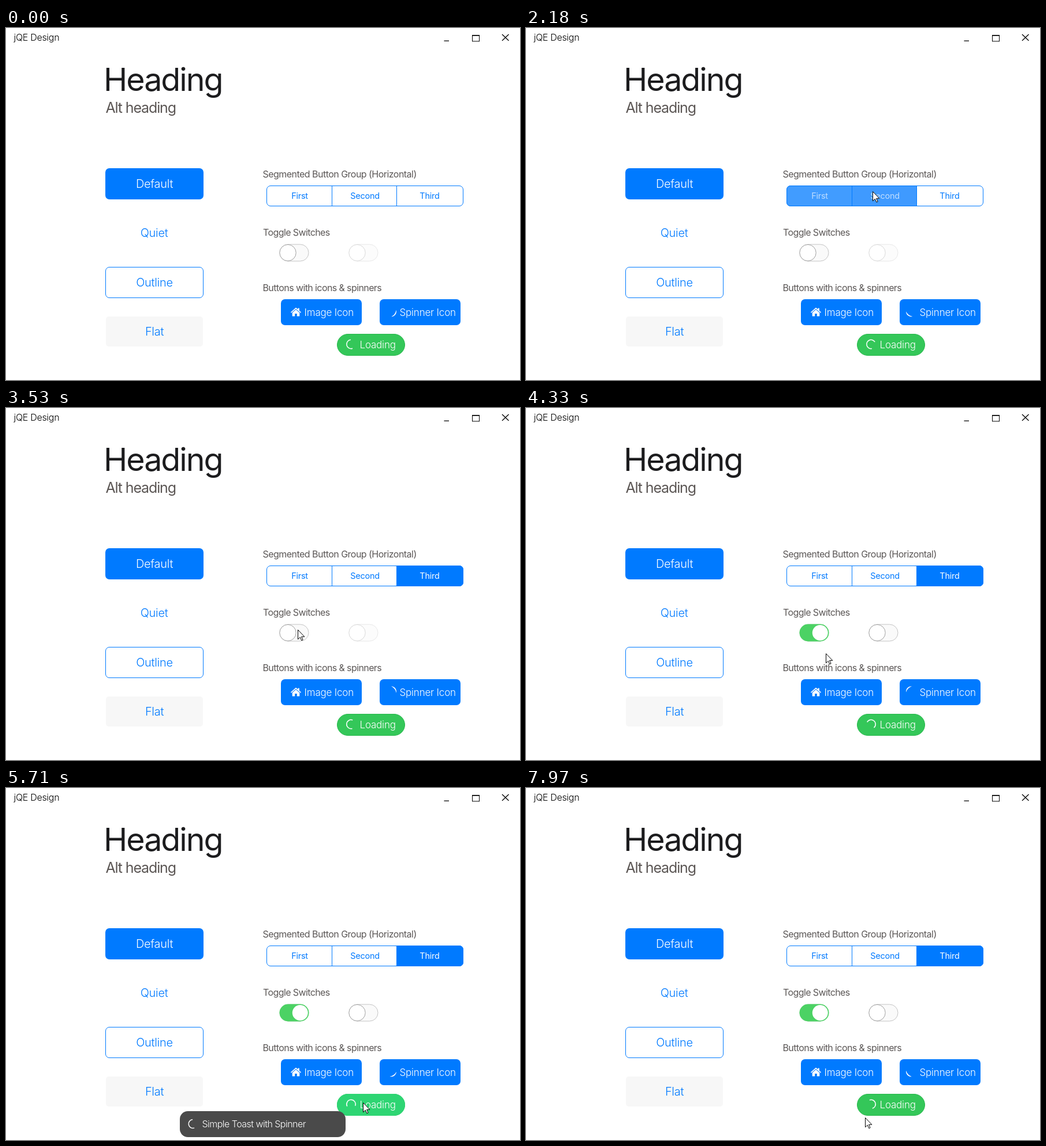
An HTML page for the animation above (8000 ms loop, 890x610 px).

```html
<!DOCTYPE html>
<html lang="en">
<head>
<meta charset="utf-8">
<title>Design widgets</title>
<style>
  html, body { margin: 0; width: 100%; height: 100%; overflow: hidden; background: #fff; }
  svg { display: block; width: 890px; height: 610px; }
  text { font-family: Inter, "Open Sans", sans-serif; font-optical-sizing: none; }
  .mid { text-anchor: middle; }
  .label { font-size: 16px; letter-spacing: -.6px; fill: #5b5756; }
  .big { font-size: 20px; font-weight: 300; letter-spacing: -.3px; }
  .seg { font-size: 14.5px; letter-spacing: -.25px; }
  .btn { font-size: 17px; font-weight: 300; letter-spacing: -.2px; fill: #fff; }
  .blue { fill: #007aff; }
  .white { fill: #fff; }
  .line { fill: none; stroke: #007aff; }
  .window { fill: none; stroke: #000; stroke-width: 1.3; }
  .spin { fill: none; stroke: #fff; stroke-width: 1.5; }
</style>
</head>
<body>
<svg viewBox="0 0 890 610">
  <defs>
    <clipPath id="round"><rect x="451" y="273" width="341" height="36" rx="7"/></clipPath>
  </defs>

  <text x="13.5" y="22" font-size="16" font-weight="300" letter-spacing="-.3">jQE Design</text>
  <g class="window">
    <path d="M758.5 22.3h8.5M859 11l11.500 11M870.500 11l-11.500 11M807 13h13"/>
    <rect x="807.5" y="12.5" width="12" height="10.500" stroke-width="1"/>
  </g>

  <text x="169" y="109" font-size="55.5" letter-spacing="-2" fill="#1c1c1e">Heading</text>
  <text x="172.5" y="147" font-size="25" letter-spacing="-1.15" fill="#5b5654">Alt heading</text>

  <rect class="blue" x="172" y="243" width="170" height="54" rx="7"/>
  <rect class="line" x="172.5" y="414.5" width="169" height="53" rx="6.5"/>
  <rect x="173" y="500" width="168" height="52" rx="5" fill="#f7f7f7"/>
  <g class="big mid">
    <text class="white" x="257" y="277">Default</text>
    <text class="blue" x="256.5" y="362">Quiet</text>
    <text class="blue" x="257" y="448">Outline</text>
    <text class="blue" x="257" y="533">Flat</text>
  </g>

  <text class="label" x="444.5" y="259" style="letter-spacing: -.53px">Segmented Button Group (Horizontal)</text>
  <text class="label" x="445" y="360">Toggle Switches</text>
  <text class="label" x="444.5" y="456">Buttons with icons &amp; spinners</text>

  <g class="seg mid blue">
    <text x="508.5" y="296">First</text>
    <text x="621.5" y="296">Second</text>
    <text x="733.5" y="296">Third</text>
  </g>
  <g class="seg mid" clip-path="url(#round)">
    <g id="first"><rect class="blue" x="451" y="273" width="114" height="36"/><text class="white" x="508.5" y="296">First</text></g>
    <g id="second"><rect class="blue" x="564" y="273" width="113" height="36"/><text class="white" x="621.5" y="296">Second</text></g>
    <g id="third"><rect class="blue" x="676" y="273" width="116" height="36"/><text class="white" x="733.5" y="296">Third</text></g>
  </g>
  <rect class="line" x="451.5" y="273.5" width="340" height="35" rx="6.5"/>
  <path class="line" d="M564.5 274v34M676.5 274v34"/>

  <rect x="474" y="375" width="50" height="29" rx="14.5" fill="#fafafa" stroke="#c4c4c4"/>
  <rect id="green" x="473.5" y="374.5" width="51" height="30" rx="15" fill="#4cd264"/>
  <circle id="knob" cy="389.5" fill="#fff"/>
  <g id="toggle2">
    <rect x="594" y="375" width="50" height="29" rx="14.5" fill="#fafafa" stroke="#c4c4c4"/>
    <circle cx="608" cy="389.5" r="14.2" fill="#fff" stroke="#a0a0a0"/>
  </g>

  <rect class="blue" x="476" y="470" width="140" height="45" rx="7"/>
  <path class="white" d="M493 492.6l9-8 3.4 3v-2h2.4v4.1l3.2 2.9-1 1.2-8-7.1-8 7.1zM495.7 493.5l6.3-5.5 6.3 5.5v6h-4.5v-4.5h-3.6v4.5h-4.5z"/>
  <text class="btn" x="516.5" y="499">Image Icon</text>
  <rect class="blue" x="647" y="470" width="140" height="45" rx="7"/>
  <rect id="hoverBlue" x="647" y="470" width="140" height="45" rx="7" fill="#2b90ff"/>
  <path id="crescent" class="white"/>
  <text class="btn" x="681.5" y="499">Spinner Icon</text>

  <rect x="573.5" y="530.5" width="117" height="37" rx="18.5" fill="#34c759" stroke="#28b84c"/>
  <rect id="hoverGreen" x="573" y="530" width="118" height="38" rx="19" fill="#2ed573"/>
  <path id="loader" class="spin"/>
  <text class="btn" x="612.5" y="555">Loading</text>

  <g id="toast">
    <rect x="301" y="560" width="287" height="45" rx="14" fill="#4a4a4a"/>
    <path id="toastLoader" class="spin"/>
    <text class="white" x="339.5" y="588" font-size="16" font-weight="300" letter-spacing="-.53">Simple Toast with Spinner</text>
  </g>

  <path id="cursor" d="M.5.5v16.3l3.8-3.6 2.5 5.6 2.3-1-2.5-5.5h5.2z" fill="#fff" stroke="#000"/>
</svg>

<script>
const LOOP = 8000, CYCLE = 1247;
const el = id => document.getElementById(id);
const set = (id, attr, value) => el(id).setAttribute(attr, value);

// Linear interpolation through rows of [position, ...values].
function along(rows, p) {
  const i = rows.findIndex(row => row[0] > p);
  if (i < 0) return rows[rows.length - 1].slice(1);
  if (i === 0) return rows[0].slice(1);
  const a = rows[i - 1], b = rows[i], k = (p - a[0]) / (b[0] - a[0]);
  return a.slice(1).map((v, n) => v + (b[n + 1] - v) * k);
}

const ramp = (t, start, length) => Math.min(1, Math.max(0, (t - start) / length));
const pulse = (t, on, off, fade) => ramp(t, on, fade) - ramp(t, off, fade);
const ease = k => k * k * (3 - 2 * k);

// Angles are clockwise degrees from the top.
function point(cx, cy, r, deg) {
  const a = deg * Math.PI / 180;
  return (cx + r * Math.sin(a)).toFixed(2) + " " + (cy - r * Math.cos(a)).toFixed(2);
}

function arc(cx, cy, r, from, to) {
  const large = to - from > 180 ? 1 : 0;
  return `M${point(cx, cy, r, from)}A${r} ${r} 0 ${large} 1 ${point(cx, cy, r, to)}`;
}

// Arc with tapered ends, closed by a flatter curve.
function crescent(cx, cy, r, mid) {
  const from = mid - 52, to = mid + 52;
  return arc(cx, cy, r, from, to) + `A16 16 0 0 0 ${point(cx, cy, r, from)}Z`;
}

// Leading and trailing end of the breathing spinner over one cycle.
const breath = [
  [0, 160, 272], [.27, -20, 162], [.46, -120, 110], [.625, -190, 60],
  [.71, -195, 20], [.88, -199, -5], [1, -200, -88]
];

function breathing(cx, cy, r, t) {
  const phase = (t / CYCLE % 1 + 1) % 1;
  return arc(cx, cy, r, ...along(breath, phase));
}

const route = [
  [50, 690, 612], [450, 675, 492], [830, 571, 402], [1250, 498, 281],
  [1750, 498, 281], [2060, 600, 283], [2200, 600, 283], [2500, 738, 286],
  [2900, 738, 286], [3340, 538, 370], [3500, 505, 384], [3850, 505, 384],
  [4100, 494, 395], [4200, 494, 395], [4850, 618, 545], [6050, 618, 545],
  [6550, 567, 587], [7590, 567, 587], [7940, 587, 571]
];

function draw(t) {
  const [x, y] = along(route, t);
  set("cursor", "transform", `translate(${x.toFixed(1)} ${y.toFixed(1)})`);

  set("first", "opacity", pulse(t, 1338, 2143, 150));
  set("second", "opacity", pulse(t, 2068, 2710, 150));
  set("third", "opacity", ramp(t, 2650, 150));

  const on = ease(ramp(t, 3640, 200));
  set("green", "opacity", on);
  set("knob", "cx", 488 + 21.3 * on);
  set("knob", "r", 14.2 - .7 * on);
  set("knob", "stroke", on > .5 ? "none" : "#a0a0a0");
  set("toggle2", "opacity", .4 + .6 * on);

  const over = (left, top, w, h) => x >= left && x < left + w && y >= top && y < top + h;
  set("hoverBlue", "opacity", over(647, 470, 140, 45) ? 1 : 0);
  set("hoverGreen", "opacity", over(573, 530, 118, 38) ? 1 : 0);

  set("crescent", "d", crescent(667, 491.3, 9, 126 - .1228 * t));
  set("loader", "d", breathing(597.5, 548, 7.7, t - 1400));
  set("toastLoader", "d", breathing(323.7, 582, 7.5, t - 875));

  const shown = ease(ramp(t, 5280, 320)) - ease(ramp(t, 7050, 320));
  set("toast", "transform", `translate(0 ${(52 * (1 - shown)).toFixed(1)})`);
}

const start = performance.now();
function tick() {
  draw((performance.now() - start) % LOOP);
  requestAnimationFrame(tick);
}
tick();
</script>
</body>
</html>
```
